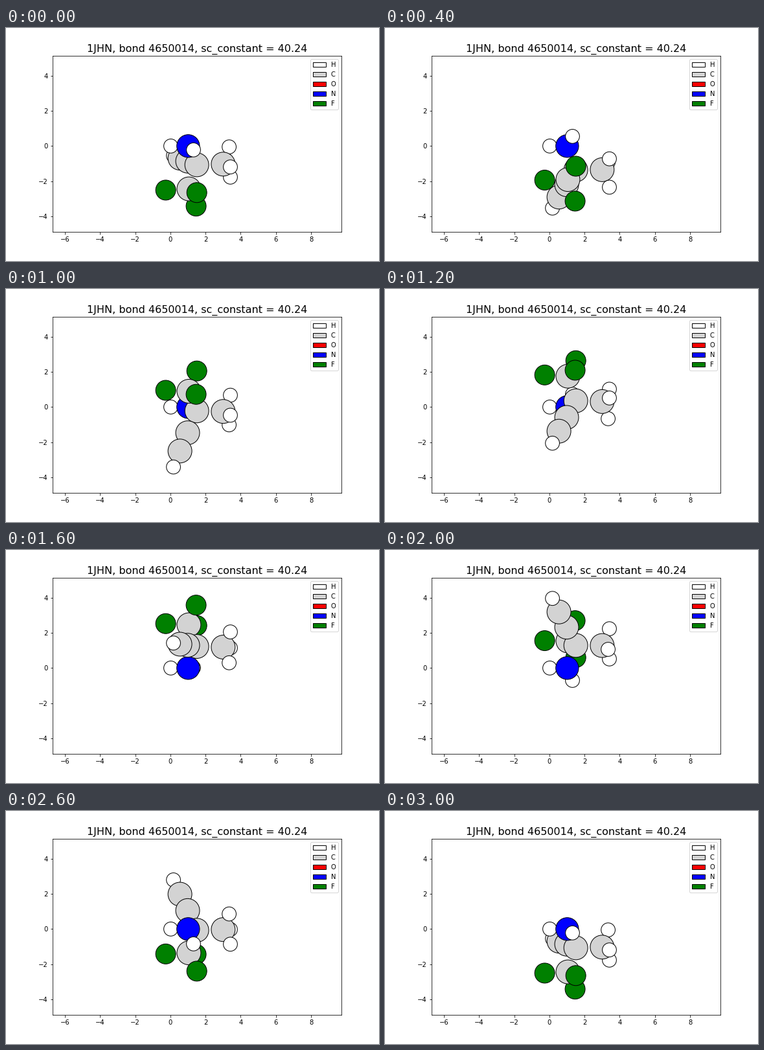
These frames come from a looping animation (576x360 px, 3200 ms). A matplotlib script:

```python
import numpy as np
import matplotlib.pyplot as plt
from matplotlib.animation import FuncAnimation
from matplotlib.patches import Circle, Patch

STEPS = 16
COLORS = {"H": "white", "C": "lightgray", "O": "red", "N": "blue", "F": "green"}
RADII = {"H": 0.40, "C": 0.68, "N": 0.65, "F": 0.57}

# element, x, y, z; the bond being turned lies on the x axis
ATOMS = [
    ("H", 0.02, 0.00, 0.00),
    ("N", 1.01, 0.00, 0.00),
    ("H", 1.31, -0.22, 0.94),
    ("C", 1.50, -1.07, -0.87),
    ("C", 3.00, -1.03, -0.885),
    ("H", 3.34, -0.05, -1.20),
    ("H", 3.41, -1.19, 0.09),
    ("H", 3.41, -1.77, -1.56),
    ("C", 1.05, -2.44, -0.37),
    ("F", -0.27, -2.51, -0.35),
    ("F", 1.50, -2.65, 0.84),
    ("F", 1.46, -3.42, -1.14),
    ("C", 0.98, -0.86, -2.19),
    ("C", 0.54, -0.69, -3.29),
    ("H", 0.17, -0.55, -4.26),
]

fig, ax = plt.subplots(figsize=(8, 5), dpi=72)
fig.subplots_adjust(left=0.125, right=0.9, bottom=0.125, top=0.88)
ax.set_xlim(-6.705, 9.745)
ax.set_ylim(-4.888, 5.128)
ax.set_xticks(range(-6, 9, 2))
ax.set_yticks(range(-4, 5, 2))
ax.set_title("1JHN, bond 4650014, sc_constant = 40.24", fontsize=16)
ax.legend(
    handles=[Patch(facecolor=c, edgecolor="black", label=e) for e, c in COLORS.items()],
    loc="upper right",
)

y0 = np.array([a[2] for a in ATOMS])
z0 = np.array([a[3] for a in ATOMS])
balls = [
    ax.add_patch(Circle((x, y), RADII[e], facecolor=COLORS[e], edgecolor="black", linewidth=1))
    for e, x, y, _ in ATOMS
]


def draw(step):
    angle = 2 * np.pi * step / (STEPS - 1)
    ys = y0 * np.cos(angle) + z0 * np.sin(angle)
    zs = z0 * np.cos(angle) - y0 * np.sin(angle)
    for rank, i in enumerate(np.argsort(zs, kind="stable")):
        balls[i].center = (ATOMS[i][1], ys[i])
        balls[i].set_zorder(1 + 0.01 * rank)
    return balls


anim = FuncAnimation(fig, draw, frames=STEPS, interval=200, repeat=True, repeat_delay=0)
plt.show()
```
